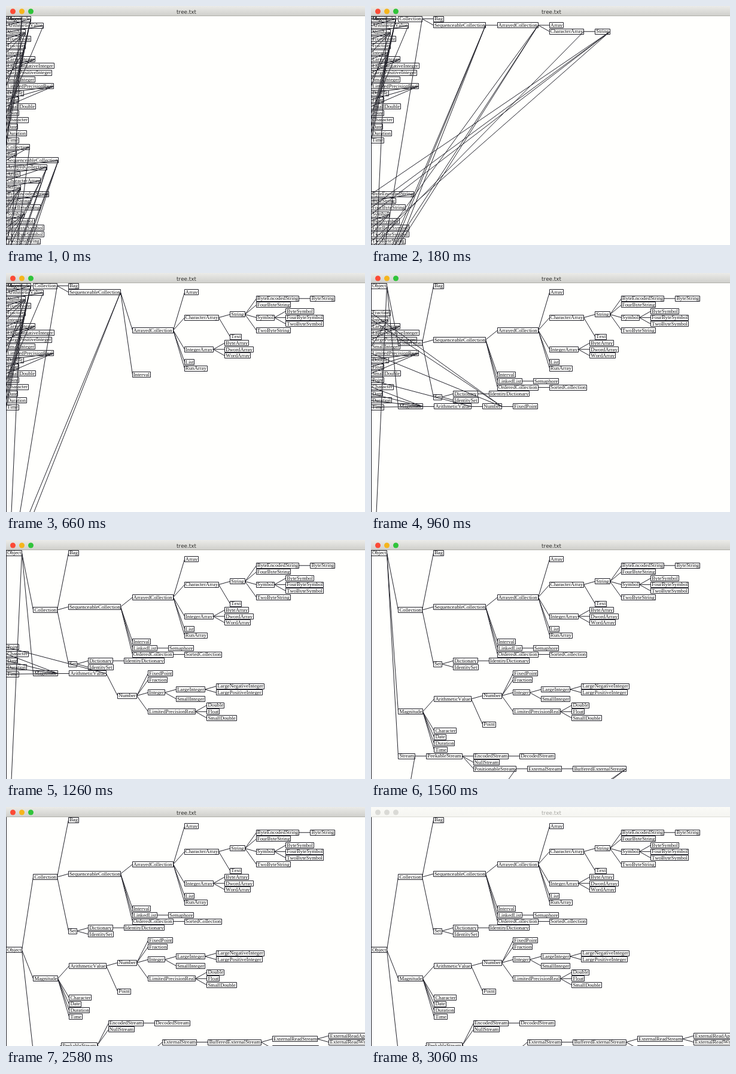
Recreate the animation shown at these times as an HTML page with a canvas. Size 600x400 px, loop 3.18 s.

```html
<!DOCTYPE html>
<html lang="en">
<head>
<meta charset="utf-8">
<title>tree.txt</title>
<style>
  html, body { margin: 0; width: 100%; height: 100%; overflow: hidden; background: #fffffd; }
  canvas { display: block; }
</style>
</head>
<body>
<canvas id="stage" width="600" height="400"></canvas>
<script>
const ctx = document.getElementById('stage').getContext('2d');
const LABEL_FONT = '8.75px "Liberation Serif", Times, serif';
const TITLE_FONT = '8.8px "DejaVu Sans", sans-serif';
const TOP = 21.5, LIST_STEP = 11.28, ROW_STEP = 10.63, GAP = 19.1, BOX_H = 9;
const TICK = 60, LOOP = 3180, BLUR_AT = 3060;
ctx.fontKerning = 'none';

const outline = `Object(
  Magnitude(
    ArithmeticValue(
      Number(FixedPoint Fraction
        Integer(LargeInteger(LargeNegativeInteger LargePositiveInteger) SmallInteger)
        LimitedPrecisionReal(Double Float SmallDouble))
      Point)
    Character Date Duration Time)
  Collection(Bag
    SequenceableCollection(
      ArrayedCollection(Array
        CharacterArray(
          String(ByteEncodedString(ByteString) FourByteString
            Symbol(ByteSymbol FourByteSymbol TwoByteSymbol) TwoByteString)
          Text)
        IntegerArray(ByteArray DwordArray WordArray) List RunArray)
      Interval LinkedList(Semaphore) OrderedCollection(SortedCollection))
    Set(Dictionary(IdentityDictionary) IdentitySet))
  Stream(
    PeekableStream(EncodedStream(DecodedStream) NullStream
      PositionableStream(
        ExternalStream(BufferedExternalStream(
          ExternalReadStream(ExternalReadAppendStream ExternalReadWriteStream)
          ExternalWriteStream))
        InternalStream(ReadStream WriteStream(ReadWriteStream TextStream))))
    Random(FastRandom LaggedFibonacciRandom)))`;

function parse(text) {
  const nodes = [], parents = [];
  ctx.font = LABEL_FONT;
  for (const token of text.match(/\w+|[()]/g)) {
    if (token === '(') parents.push(nodes[nodes.length - 1]);
    else if (token === ')') parents.pop();
    else {
      const node = { name: token, kids: [], w: ctx.measureText(token).width + 3 };
      if (parents.length) parents[parents.length - 1].kids.push(node);
      nodes.push(node);
    }
  }
  return nodes;
}

const nodes = parse(outline);

// Depth-first layout, recorded as a list of moves.
const moves = [];
let row = 0;
function arrange(node, x) {
  const first = row, rowY = r => TOP + r * ROW_STEP;
  moves.push({ node, x, y: rowY(first) });
  if (!node.kids.length) { row++; return; }
  [...node.kids].sort((a, b) => a.name < b.name ? -1 : 1)
    .forEach(kid => arrange(kid, x + node.w + GAP));
  const middle = (first + row - 1) / 2;
  if (middle > first) moves.push({ node, x, y: rowY(middle) });
}
arrange(nodes[0], 0);

// Pace of the layout: [tick, moves done]
const pace = [[0, 1], [7, 18], [11, 29], [16, 44], [26, 73], [33, moves.length]];
function movesAt(tick) {
  const i = pace.findIndex(p => p[0] > tick);
  if (i < 0) return moves.length;
  const [t0, n0] = pace[i - 1], [t1, n1] = pace[i];
  return Math.floor(n0 + (n1 - n0) * (tick - t0) / (t1 - t0));
}

const snap = v => Math.floor(v) + 0.5;

function drawTree(count) {
  nodes.forEach((n, i) => { n.x = 0; n.y = TOP + (i - 1) * LIST_STEP; });
  moves.slice(0, count).forEach(({ node, x, y }) => Object.assign(node, { x, y }));

  ctx.font = LABEL_FONT;
  ctx.textAlign = 'left';
  ctx.lineWidth = 1;
  ctx.strokeStyle = '#22222a';
  ctx.fillStyle = '#101014';
  ctx.beginPath();
  for (const n of nodes) {
    const left = snap(n.x + 0.4), right = snap(n.x + 0.4 + n.w);
    ctx.rect(left, snap(n.y - BOX_H / 2), right - left, BOX_H);
    ctx.fillText(n.name, n.x + 2, Math.round(n.y + 2.7));
    for (const kid of n.kids) {
      ctx.moveTo(right, n.y);
      ctx.lineTo(snap(kid.x + 0.4), kid.y);
    }
  }
  ctx.moveTo(0.5, 16);
  ctx.lineTo(0.5, 400);
  ctx.stroke();
}

function drawTitleBar(active) {
  const shade = ctx.createLinearGradient(0, 0, 0, 16);
  shade.addColorStop(0, active ? '#ebebe8' : '#fafaf7');
  shade.addColorStop(1, active ? '#d0d0cc' : '#f5f5f1');
  ctx.fillStyle = shade;
  ctx.fillRect(0, 0, 600, 16);
  ctx.fillStyle = active ? '#b0b0aa' : '#dcdcd6';
  ctx.fillRect(0, 16, 600, 1);
  ['#fc4a35', '#f5b51c', '#30c43a'].forEach((color, i) => {
    ctx.fillStyle = active ? color : '#dadad6';
    ctx.beginPath();
    ctx.arc(11.5 + 15 * i, 9, 4.5, 0, 7);
    ctx.fill();
  });
  ctx.font = TITLE_FONT;
  ctx.textAlign = 'center';
  ctx.fillStyle = active ? '#30302e' : '#a8a8a4';
  ctx.fillText('tree.txt', 301.5, 12.5);
}

const start = performance.now();
function frame() {
  const t = Math.max(0, performance.now() - start) % LOOP;
  ctx.fillStyle = '#fffffd';
  ctx.fillRect(0, 0, 600, 400);
  drawTree(movesAt(Math.floor(t / TICK)));
  drawTitleBar(t < BLUR_AT);
  requestAnimationFrame(frame);
}
frame();
</script>
</body>
</html>
```
